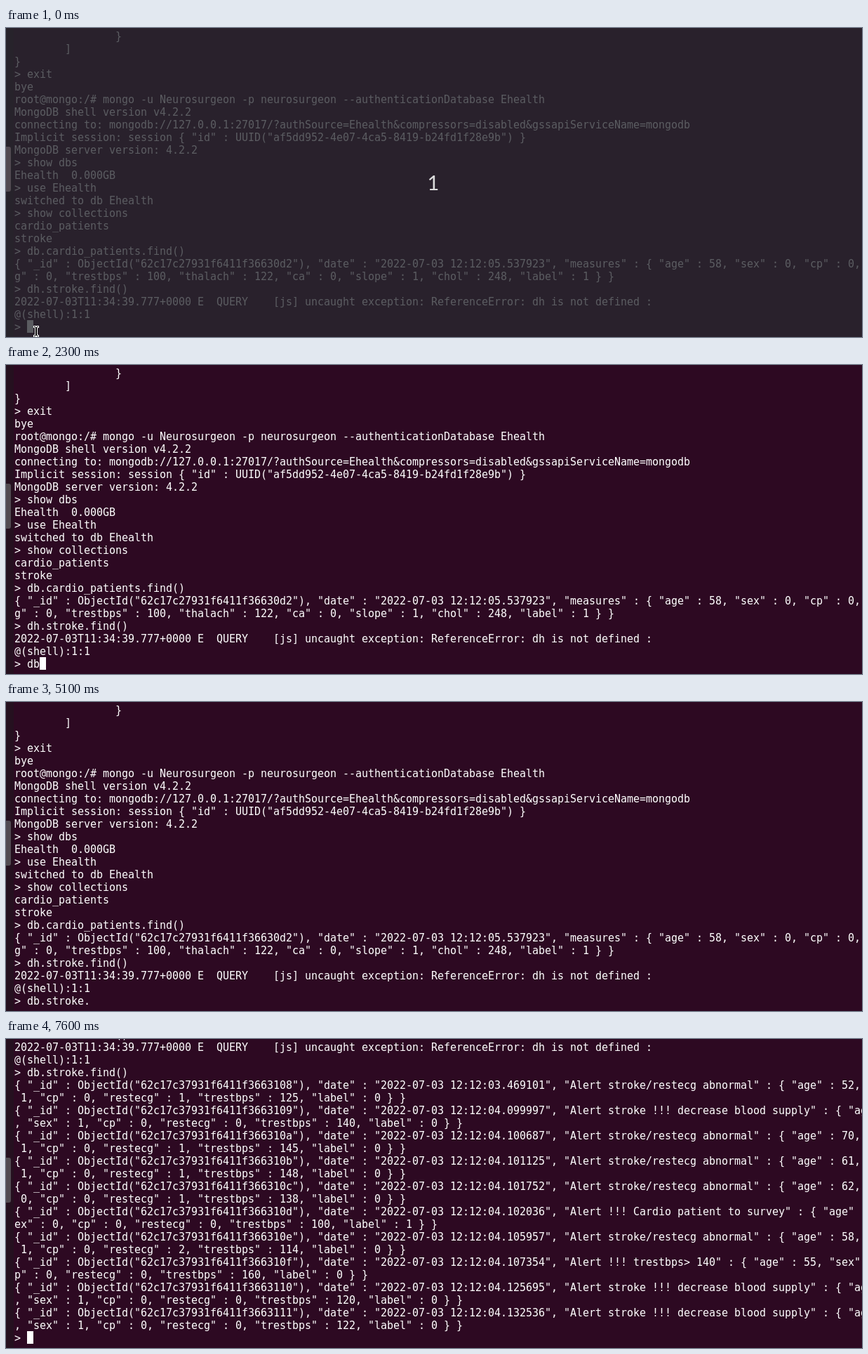
Recreate the animation shown at these times as an HTML page with a canvas. Size 1220x440 px, loop 8000 ms.

```html
<!DOCTYPE html>
<html lang="en">
<head>
<meta charset="utf-8">
<title>Mongo shell</title>
<style>
html, body { margin: 0; width: 1220px; height: 440px; overflow: hidden; background: #2d0922; }
canvas { display: block; }
</style>
</head>
<body>
<canvas id="stage" width="1220" height="440"></canvas>
<script>
const ctx = document.getElementById('stage').getContext('2d');
const W = 1220, H = 440, LOOP = 8000;
const LEFT = 12, TOP = 2, CELL = 9, LINE = 18, BASE = 15;
const LAST_ROW = 23;
const COMMAND = 'db.stroke.find()';
const RESULT_AT = 7600;

const session = `                }
        ]
}
> exit
bye
root@mongo:/# mongo -u Neurosurgeon -p neurosurgeon --authenticationDatabase Ehealth
MongoDB shell version v4.2.2
connecting to: mongodb://127.0.0.1:27017/?authSource=Ehealth&compressors=disabled&gssapiServiceName=mongodb
Implicit session: session { "id" : UUID("af5dd952-4e07-4ca5-8419-b24fd1f28e9b") }
MongoDB server version: 4.2.2
> show dbs
Ehealth  0.000GB
> use Ehealth
switched to db Ehealth
> show collections
cardio_patients
stroke
> db.cardio_patients.find()
{ "_id" : ObjectId("62c17c27931f6411f36630d2"), "date" : "2022-07-03 12:12:05.537923", "measures" : { "age" : 58, "sex" : 0, "cp" : 0,
g" : 0, "trestbps" : 100, "thalach" : 122, "ca" : 0, "slope" : 1, "chol" : 248, "label" : 1 } }
> dh.stroke.find()
2022-07-03T11:34:39.777+0000 E  QUERY    [js] uncaught exception: ReferenceError: dh is not defined :
@(shell):1:1`.split('\n');

// One wrapped document: the visible part of its first line, then the second line
function record(id, time, alert, fields, start, restecg, trestbps, label = 0) {
  return [
    `{ "_id" : ObjectId("62c17c37931f6411f3663${id}"), "date" : "2022-07-03 12:12:${time}", "Alert ${alert}" : { ${fields}`,
    `${start} : 0, "restecg" : ${restecg}, "trestbps" : ${trestbps}, "label" : ${label} } }`
  ];
}
const abnormal = (id, time, age, sex, restecg, bps) =>
  record(id, time, 'stroke/restecg abnormal', `"age" : ${age},`, ` ${sex}, "cp"`, restecg, bps);
const supply = (id, time, bps) =>
  record(id, time, 'stroke !!! decrease blood supply', '"age', ', "sex" : 1, "cp"', 0, bps);

const result = [
  ...session.slice(-2),
  '> ' + COMMAND,
  ...abnormal('108', '03.469101', 52, 1, 1, 125),
  ...supply('109', '04.099997', 140),
  ...abnormal('10a', '04.100687', 70, 1, 1, 145),
  ...abnormal('10b', '04.101125', 61, 1, 1, 148),
  ...abnormal('10c', '04.101752', 62, 0, 1, 138),
  ...record('10d', '04.102036', '!!! Cardio patient to survey', '"age"', 'ex" : 0, "cp"', 0, 100, 1),
  ...abnormal('10e', '04.105957', 58, 1, 2, 114),
  ...record('10f', '04.107354', '!!! trestbps> 140', '"age" : 55, "sex"', 'p"', 0, 160),
  ...supply('110', '04.125695', 120),
  ...supply('111', '04.132536', 122)
];

const keyTimes = [2200, 2300, 3100, 3300, 3500, 3700, 3800, 4000, 4200, 4600,
  5500, 5600, 5800, 5900, 6300, 6700];
const cursorOff = [[300, 900], [1600, 2100], [5100, 5400], [7200, 7400]];

function drawRow(text, row) {
  const y = TOP + row * LINE + BASE;
  for (let i = 0; i < text.length; i++) {
    if (text[i] !== ' ') ctx.fillText(text[i], LEFT + i * CELL, y);
  }
}

function drawThumb() {
  ctx.fillStyle = '#524b52';
  ctx.beginPath();
  ctx.roundRect(-4, 169, 11, 64, 3);
  ctx.fill();
}

function drawPointer() {
  ctx.fillStyle = '#fff';
  ctx.fillRect(39, 424, 8, 3);
  ctx.fillRect(39, 437, 8, 3);
  ctx.fillRect(41, 425, 4, 14);
  ctx.fillStyle = '#000';
  ctx.fillRect(40, 425, 2, 1);
  ctx.fillRect(44, 425, 2, 1);
  ctx.fillRect(40, 438, 2, 1);
  ctx.fillRect(44, 438, 2, 1);
  ctx.fillRect(42, 426, 2, 12);
}

function drawCountdown() {
  ctx.fillStyle = 'rgba(40, 42, 48, 0.76)';
  ctx.fillRect(0, 0, W, H);
  ctx.fillStyle = '#dcdcdc';
  ctx.font = '29px Lato, sans-serif';
  ctx.textAlign = 'center';
  ctx.fillText('1', 609, 231);
  ctx.textAlign = 'left';
}

function draw(t) {
  const done = t >= RESULT_AT;
  const typed = done ? 0 : keyTimes.filter(k => t >= k).length;

  ctx.fillStyle = '#2d0922';
  ctx.fillRect(0, 0, W, H);
  ctx.fillStyle = '#25101f';
  ctx.fillRect(0, 0, 11, H);

  ctx.fillStyle = '#fff';
  ctx.font = '15px "DejaVu Sans Mono", monospace';
  if (done) drawRow('> dh.stroke.find()', -1);
  (done ? result : session).forEach(drawRow);
  drawRow('> ' + COMMAND.slice(0, typed), LAST_ROW);
  if (!cursorOff.some(([a, b]) => t >= a && t < b)) {
    ctx.fillRect(LEFT + (2 + typed) * CELL, TOP + LAST_ROW * LINE, CELL, LINE);
  }

  if (t < 100) drawCountdown();
  drawThumb();
  if (t < keyTimes[0]) drawPointer();
}

const start = performance.now();
function tick() {
  draw((performance.now() - start) % LOOP);
  requestAnimationFrame(tick);
}
tick();
</script>
</body>
</html>
```
